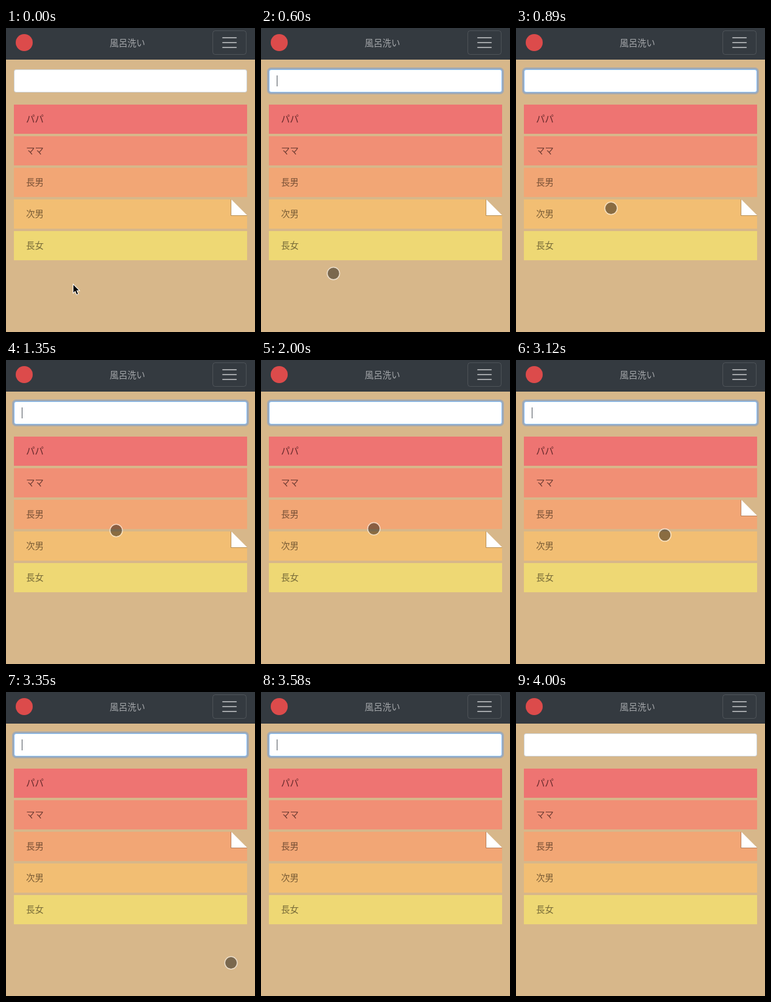
These frames come from a looping animation (410 by 500 pixels, 4100 ms). An HTML page with a canvas:

```html
<!DOCTYPE html>
<html lang="ja">
<head>
<meta charset="utf-8">
<title>風呂洗い</title>
<style>
html, body { margin: 0; width: 100%; height: 100%; overflow: hidden; background: #d7b78a; }
canvas { display: block; width: 410px; height: 500px; }
</style>
</head>
<body>
<canvas id="stage" lang="ja"></canvas>
<script>
const LOOP = 4100;
const FPS = 17;
const SAND = '#d7b78a';
const FONT = '14.6px "Noto Sans CJK JP", "Noto Sans CJK", sans-serif';

const rows = [
  { label: 'パパ', fill: '#ee7472', ink: '#64282a' },
  { label: 'ママ', fill: '#f18f75', ink: '#6f3d33' },
  { label: '長男', fill: '#f2a675', ink: '#785036' },
  { label: '次男', fill: '#f2be73', ink: '#785b35' },
  { label: '長女', fill: '#eed874', ink: '#776b39' }
];

const focusAt = 180, blurAt = 4000, blink = 486;
const earOff = 2230, earOn = 2755;
const pointerStart = { x: 110, y: 421 };
const pointerMovesAt = 600;

// Pointer glides, timed in ticks of the screen
const glides = [
  { from: 9, to: 15, x: 156.5, y: 296.5 },
  { from: 16, to: 23, x: 181.5, y: 280.5 },
  { from: 33, to: 40, x: 206.5, y: 255.5 },
  { from: 52, to: 57, x: 370.5, y: 445.5 },
  { from: 57, to: 59, x: 377, y: 520 }
];

const canvas = document.getElementById('stage');
const ctx = canvas.getContext('2d');
const dpr = window.devicePixelRatio || 1;
canvas.width = 410 * dpr;
canvas.height = 500 * dpr;
ctx.scale(dpr, dpr);

function rect(x, y, w, h, color) {
  ctx.fillStyle = color;
  ctx.fillRect(x, y, w, h);
}

function roundRect(x, y, w, h, r, color) {
  ctx.beginPath();
  ctx.roundRect(x, y, w, h, r);
  ctx.fillStyle = color;
  ctx.fill();
}

function tracePolygon(points) {
  ctx.beginPath();
  points.forEach(([x, y]) => ctx.lineTo(x, y));
  ctx.closePath();
}

function disc(x, y, r, color) {
  ctx.beginPath();
  ctx.arc(x, y, r, 0, Math.PI * 2);
  ctx.fillStyle = color;
  ctx.fill();
}

function stroke(color, width) {
  ctx.strokeStyle = color;
  ctx.lineWidth = width;
  ctx.stroke();
}

function text(str, x, y, color, align) {
  ctx.font = FONT;
  ctx.textAlign = align;
  ctx.fillStyle = color;
  ctx.fillText(str, x, y);
}

function drawHeader() {
  rect(0, 0, 410, 52, '#343a40');
  disc(30, 24, 14, '#dc4b4b');
  text('風呂洗い', 200, 29.5, '#a4a7aa', 'center');
  ctx.beginPath();
  ctx.roundRect(340.5, 4.5, 55, 39, 4);
  stroke('rgba(255,255,255,.13)', 1);
  for (let i = 0; i < 3; i++) roundRect(356, 15 + i * 8, 24, 2, 1, '#a3a6a9');
}

function drawInput(t) {
  const focused = t >= focusAt && t < blurAt;
  if (focused) roundRect(10, 65, 390, 44, 6.5, '#a2a9b2');
  roundRect(13, 68, 384, 38, 4, focused ? '#80bdff' : '#ced4da');
  roundRect(14, 69, 382, 36, 3, '#fff');
  const caretOn = Math.floor((t - focusAt) / blink) % 2 === 0;
  if (focused && caretOn) rect(26, 78, 1, 18, '#495057');
}

function drawEar(y) {
  const shade = 'rgba(0,0,0,.24)';
  rect(371, y, 26, 26, SAND);
  rect(370, y, 1, 27, shade);
  rect(371, y + 26, 26, 1, shade);
  tracePolygon([[371, y], [371, y + 26], [397, y + 26]]);
  ctx.fillStyle = '#fff';
  ctx.fill();
}

function drawRows(t) {
  const top = i => 126 + i * 52;
  rows.forEach(({ label, fill, ink }, i) => {
    rect(13, top(i), 384, 48, fill);
    text(label, 33, top(i) + 29, ink, 'left');
  });
  if (t < earOff) drawEar(top(3));
  else if (t >= earOn) drawEar(top(2));
}

function drawArrow({ x, y }) {
  ctx.save();
  ctx.translate(x + 1, y + 1.5);
  tracePolygon([[0, 0], [0, 12.5], [3, 9.8], [5.5, 15.5], [7.5, 14.7], [5, 9], [9, 9]]);
  stroke('#fff', 2);
  ctx.fillStyle = '#000';
  ctx.fill();
  ctx.restore();
}

// Each glide bends slightly: x leads, y trails.
function pointerAt(tick) {
  let { x, y } = pointerStart;
  for (const g of glides) {
    const k = Math.min(1, Math.max(0, (tick - g.from) / (g.to - g.from)));
    x += (g.x - x) * k ** 0.9;
    y += (g.y - y) * k ** 1.1;
  }
  return { x, y };
}

function drawPointer(t) {
  if (t < pointerMovesAt) return drawArrow(pointerStart);
  const { x, y } = pointerAt(Math.floor((t + 9) * FPS / 1000));
  disc(x, y, 9.7, 'rgba(0,0,0,.43)');
  ctx.beginPath();
  ctx.arc(x, y, 10.2, 0, Math.PI * 2);
  stroke('rgba(255,255,255,.55)', 1.6);
}

function draw(t) {
  rect(0, 0, 410, 500, SAND);
  drawHeader();
  drawInput(t);
  drawRows(t);
  drawPointer(t);
}

const start = performance.now();
function frame() {
  draw((performance.now() - start) % LOOP);
  requestAnimationFrame(frame);
}
frame();
</script>
</body>
</html>
```
